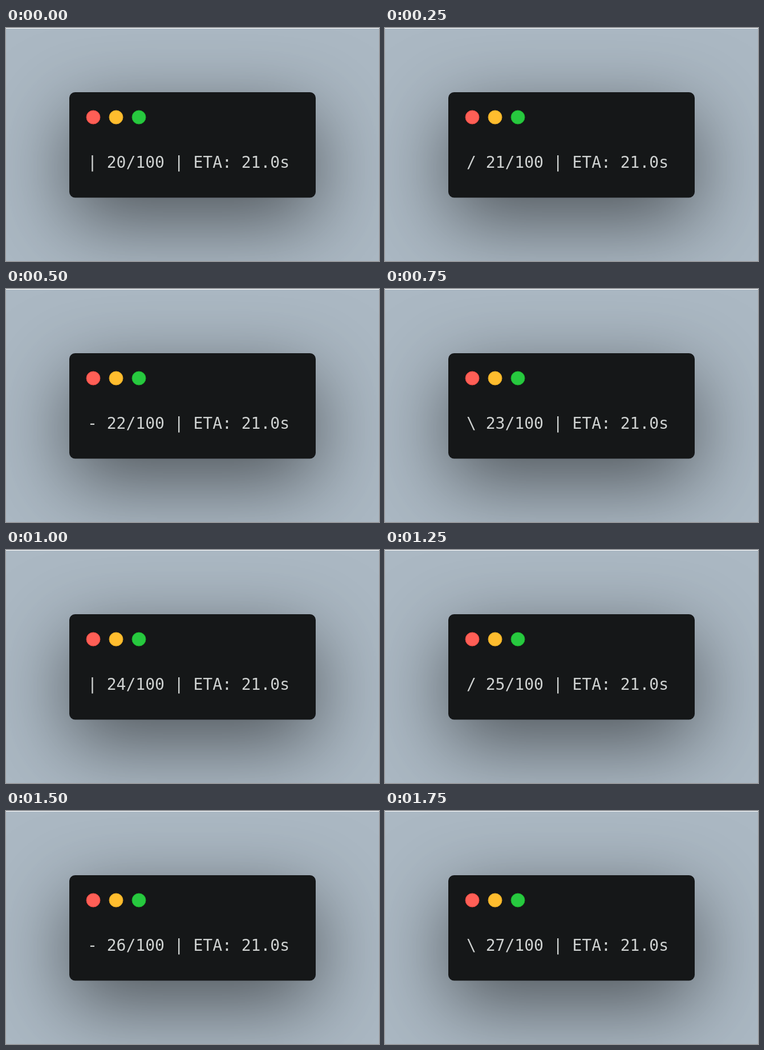
Animation, 654 px wide and 410 px high, one loop 2000 ms. Source, as an HTML page with a canvas:

```html
<!DOCTYPE html>
<html lang="en">
<head>
<meta charset="utf-8">
<title>Progress spinner</title>
<style>
  html, body { margin: 0; width: 100%; height: 100%; overflow: hidden; background: #abb8c3; }
  canvas { display: block; }
</style>
</head>
<body>
<canvas id="stage" width="654" height="410"></canvas>
<script>
const ctx = document.getElementById('stage').getContext('2d');
const STEP = 250, LOOP = 2000;
const SPINNER = '|/-\\';
const BUTTONS = [
  ['#ff5f56', '#e0443e'],
  ['#ffbd2e', '#dea123'],
  ['#27c93f', '#1aab29']
];

function drawWindow() {
  ctx.save();
  ctx.shadowColor = 'rgba(0, 0, 0, 0.55)';
  ctx.shadowBlur = 136;
  ctx.shadowOffsetY = 40;
  ctx.fillStyle = '#151718';
  ctx.beginPath();
  ctx.roundRect(111, 113, 432, 185.5, 10);
  ctx.fill();
  ctx.restore();
}

function drawButtons() {
  BUTTONS.forEach(([fill, edge], i) => {
    ctx.beginPath();
    ctx.arc(153 + i * 40, 157, 12, 0, Math.PI * 2);
    ctx.fillStyle = fill;
    ctx.fill();
    ctx.strokeStyle = edge;
    ctx.lineWidth = 1;
    ctx.stroke();
  });
}

function drawStatus(step) {
  ctx.font = '28px "DejaVu Sans Mono", monospace';
  ctx.fillStyle = '#cfd2d1';
  ctx.fillText(`${SPINNER[step % 4]} ${20 + step}/100 | ETA: 21.0s`, 143, 245.5);
}

function draw(step) {
  ctx.fillStyle = '#abb8c3';
  ctx.fillRect(0, 0, 654, 410);
  drawWindow();
  drawButtons();
  drawStatus(step);
  ctx.fillStyle = '#fff';
  ctx.fillRect(0, 0, 654, 1);
}

const start = performance.now();
let shown = -1;

function tick() {
  const step = Math.floor(((performance.now() - start) % LOOP) / STEP);
  if (step !== shown) draw(shown = step);
  requestAnimationFrame(tick);
}
tick();
</script>
</body>
</html>
```
